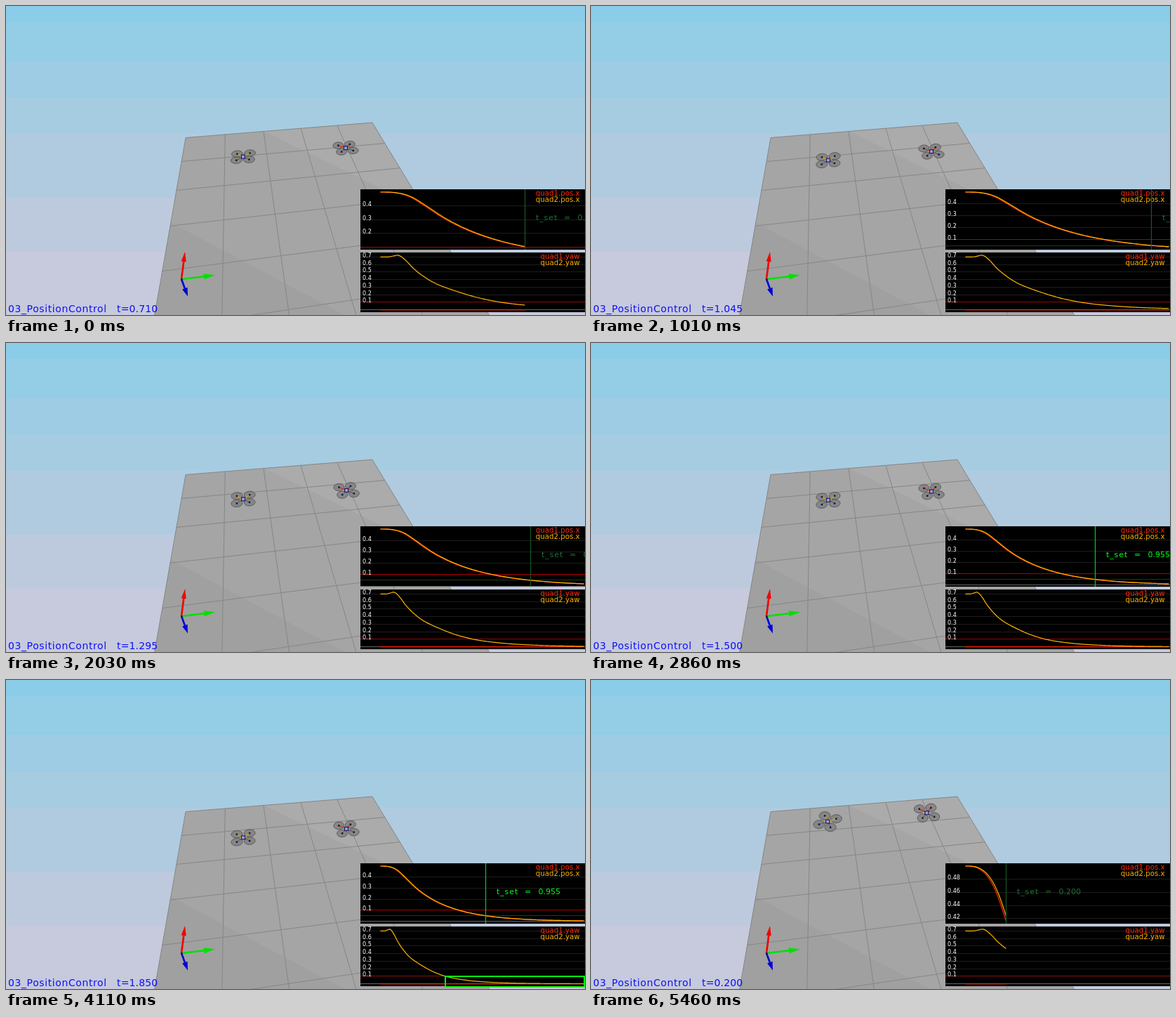
These frames come from a looping animation (825 by 440 pixels, 5.56 s). An HTML page with a canvas:

```html
<!DOCTYPE html>
<html lang="en">
<head>
<meta charset="utf-8">
<title>Position control</title>
<style>
  html, body { margin: 0; width: 100%; height: 100%; overflow: hidden; background: #c6cadc; }
  canvas { display: block; width: 825px; height: 440px; }
</style>
</head>
<body>
<canvas id="stage" width="825" height="440"></canvas>
<script>
const ctx = document.getElementById('stage').getContext('2d');
const LOOP = 5560, STEPS = 93;
const SHORT_STEPS = [15, 45, 56, 71, 76, 83];   // these arrive 10 ms early
const FONT = '"DejaVu Sans", sans-serif';
const RED = '#ff2a0a', AMBER = '#ffb400';

// Smooth curve through [x, y] knots
function curve(knots) {
  const last = knots.length - 1;
  const slope = i => {
    const a = knots[Math.max(0, i - 1)], b = knots[Math.min(last, i + 1)];
    return (b[1] - a[1]) / (b[0] - a[0]);
  };
  return x => {
    if (x <= knots[0][0]) return knots[0][1];
    if (x >= knots[last][0]) return knots[last][1];
    let i = 0;
    while (x > knots[i + 1][0]) i++;
    const [x0, y0] = knots[i], [x1, y1] = knots[i + 1];
    const d = x1 - x0, s = (x - x0) / d, s2 = s * s, s3 = s2 * s;
    return y0 * (2 * s3 - 3 * s2 + 1) + y1 * (3 * s2 - 2 * s3)
      + d * (slope(i) * (s3 - 2 * s2 + s) + slope(i + 1) * (s3 - s2));
  };
}

function linear(knots, x) {
  let i = 0;
  while (i < knots.length - 2 && x > knots[i + 1][0]) i++;
  const [x0, y0] = knots[i], [x1, y1] = knots[i + 1];
  return y0 + (y1 - y0) * (x - x0) / (x1 - x0);
}

// ---- timing ----
const RESTART = 80;
const FIRST_RUN = [[0, .71], [17, 1.045], [34, 1.295], [48, 1.5], [69, 1.85], [79, 2.015]];
const SECOND_RUN = [[80, .005], [84, .07], [92, .2]];

function stepAt(ms) {
  let k = 0;
  const start = n => 60 * n - 10 * SHORT_STEPS.filter(s => s <= n).length;
  while (k < STEPS - 1 && ms >= start(k + 1)) k++;
  return k;
}

function simTime(step) {
  const t = linear(step < RESTART ? FIRST_RUN : SECOND_RUN, step);
  return Math.round(t * 200) / 200;
}

// ---- signals ----
const earlyPos = curve([[0, .5], [.02, .4999], [.045, .4987], [.07, .4953], [.1, .4875],
  [.13, .474], [.16, .4535], [.2, .4165], [.25, .3677], [.3, .319]]);
const pos1 = t => t < .25 ? earlyPos(t) : .746 * Math.exp(-2.83 * t);
const pos2 = t => pos1(Math.max(0, t - .008));
const earlyYaw = curve([[0, .7], [.02, .699], [.043, .701], [.07, .716], [.085, .722],
  [.1, .708], [.126, .65], [.161, .552], [.2, .466], [.25, .378], [.3, .315],
  [.4, .222], [.488, .155], [.59, .1], [.65, .079]]);
const yaw2 = t => t < .59 ? earlyYaw(t) : .1 * Math.exp(-3.9 * (t - .59));
const SETTLE = .955, SETTLED = 1.455, YAW_OK = .59, YAW_PASS = 1.59;

// ---- drawing helpers ----
const crisp = v => Math.floor(v) + .5;

function line(x0, y0, x1, y1, color, width = 1) {
  ctx.strokeStyle = color;
  ctx.lineWidth = width;
  ctx.beginPath();
  ctx.moveTo(x0, y0);
  ctx.lineTo(x1, y1);
  ctx.stroke();
}

function poly(points, fill) {
  ctx.fillStyle = fill;
  ctx.beginPath();
  points.forEach(p => ctx.lineTo(p[0], p[1]));
  ctx.closePath();
  ctx.fill();
}

function text(str, x, y, size, color, align = 'left', spacing = 0) {
  ctx.font = `${size}px ${FONT}`;
  ctx.letterSpacing = spacing + 'px';
  ctx.textAlign = align;
  ctx.fillStyle = color;
  ctx.fillText(str, x, y);
}

// ---- scene ----
// Perspective of the tiled floor: 5 columns wide, running out of view below
const ROWS = 6;
function floor(u, v) {
  const w = 1 + .0148 * u - .087 * v;
  return [(60.9 * u - 27.7 * v + 256) / w, (-1.84 * u + 14.66 * v + 187.5) / w];
}

function drawSky() {
  [[0, '#8bcde8'], [22, '#93cde6'], [78, '#9dcce4'], [130, '#a6cce2'],
   [182, '#b0cbe0'], [273, '#bdcade'], [350, '#c6cadc']].forEach(([y, color]) => {
    ctx.fillStyle = color;
    ctx.fillRect(0, y, 825, 440 - y);
  });
}

function drawFloor() {
  const outline = [floor(0, 0), floor(5, 0), floor(5, ROWS), floor(0, ROWS)];
  ctx.save();
  poly(outline, '#a5a5a5');
  ctx.beginPath();
  outline.forEach(p => ctx.lineTo(...p));
  ctx.closePath();
  ctx.clip();
  poly([[330, 160], [700, 160], [700, 340]], '#ababab');
  poly([[200, 290], [200, 460], [520, 460]], '#a0a0a0');
  ctx.restore();
  for (let u = 0; u <= 5; u++) line(...floor(u, 0), ...floor(u, ROWS), '#868686');
  for (let v = 0; v <= ROWS; v++) line(...floor(0, v), ...floor(5, v), '#868686');
}

function arrow(x, y, tipX, tipY, head, half, color) {
  const len = Math.hypot(tipX - x, tipY - y);
  const dx = (tipX - x) / len, dy = (tipY - y) / len;
  const bx = tipX - dx * head, by = tipY - dy * head;
  line(x, y, bx, by, color, 2.6);
  poly([[tipX, tipY], [bx - dy * half, by + dx * half], [bx + dy * half, by - dx * half]], color);
}

function drawAxes() {
  arrow(250, 389, 255, 350, 14, 3.5, '#f00000');
  arrow(250, 389, 298, 383.3, 16, 4, '#00e000');
  arrow(250, 389, 259, 413.5, 12, 4, '#0000d8');
  ctx.fillStyle = '#222';
  ctx.fillRect(249, 388, 2.5, 2.5);
}

// Screen height of the body's forward axis: grows as the craft pitches
const pitch = curve([[0, 4.8], [.035, 6.7], [.07, 7.7], [.2, 6.4], [.71, 4.5],
  [1.045, 5.1], [1.295, 5.3], [1.5, 5.4], [1.85, 5.5]]);
const sink = curve([[0, 0], [.07, .4], [.2, 2], [.71, 15], [1.045, 20],
  [1.295, 22.7], [1.5, 24.2], [1.85, 24.8]]);
const drift = curve([[0, 0], [.07, .2], [.2, 1.5], [.71, 7], [1.045, 8], [1.85, 8]]);

function drawQuad(x, y, side, lean, height, yaw, rx, color) {
  const ry = 1.6 + .67 * height;
  const rotors = [0, 1, 2, 3].map(k => {
    const a = Math.PI / 4 + k * Math.PI / 2 - yaw;
    const c = Math.SQRT2 * Math.cos(a), s = Math.SQRT2 * Math.sin(a);
    return [x + c * side + s * lean, y - c * .85 - s * height];
  });
  rotors.forEach(([px, py]) => {
    ctx.beginPath();
    ctx.ellipse(px, py, rx, ry, -.06, 0, 7);
    ctx.fillStyle = 'rgba(128,128,128,.85)';
    ctx.fill();
    ctx.strokeStyle = '#5c5c5c';
    ctx.lineWidth = 1;
    ctx.stroke();
  });
  rotors.forEach(([px, py], k) => {
    line(x, y, px, py, k < 2 ? color : '#55556a', k < 2 ? 1.3 : 1);
    ctx.fillStyle = '#15153a';
    ctx.fillRect(px - 1.2, py - 1.2, 2.4, 2.4);
  });
  ctx.fillStyle = '#9ca4c4';
  ctx.fillRect(x - 2.5, y - 2.5, 5, 5);
  ctx.strokeStyle = '#1c1c6c';
  ctx.lineWidth = 1.2;
  ctx.strokeRect(x - 2.5, y - 2.5, 5, 5);
}

// ---- charts ----
const LEFT = 505, RIGHT = 825, X0 = 533.4, SPAN = 290;

function tickStep(range) {
  const base = 10 ** Math.floor(Math.log10(range / 3.8) + 1e-9);
  return base * [5, 2, 1].find(m => range / (base * m) >= 3.8 || m === 1);
}

function drawChart(c, t) {
  const px = s => X0 + SPAN * s / Math.max(1, t);
  const range = c.max - c.min;
  const py = v => c.top + (c.max - v) * (c.bottom - c.top) / range;
  const level = (v, color) => line(LEFT, crisp(py(v)), RIGHT, crisp(py(v)), color);

  ctx.save();
  ctx.beginPath();
  ctx.rect(LEFT, c.y, RIGHT - LEFT, c.h);
  ctx.clip();
  ctx.fillStyle = '#000';
  ctx.fillRect(LEFT, c.y, RIGHT - LEFT, c.h);

  const step = tickStep(range);
  const digits = Math.max(1, -Math.floor(Math.log10(step) + 1e-6));
  const eps = step * 1e-3;
  const ticks = [];
  for (let n = Math.floor(c.min / step) + 1; n * step < c.max - eps; n++) {
    if (n * step > c.min + eps) ticks.push(n * step);
  }
  ticks.forEach(v => level(v, '#1d1d1d'));
  level(0, '#666');
  level(.1, c.limit);
  if (c.band) level(c.band, '#1b3a20');

  c.series.forEach(([name, fn, color], i) => {
    ctx.strokeStyle = color;
    ctx.lineWidth = 1.2;
    ctx.beginPath();
    const count = Math.max(2, Math.ceil(px(t) - X0));
    for (let n = 0; n <= count; n++) {
      const s = t * n / count;
      ctx.lineTo(px(s), py(fn(s)));
    }
    ctx.stroke();
    text(name, 817.5, c.y + 9 + 9 * i, 10.2, color, 'right');
  });
  ticks.forEach(v => text(v.toFixed(digits), 508, py(v) + .5, 8, '#fff'));
  if (c.extra) c.extra(px);
  ctx.restore();
}

function drawSettling(t, px) {
  const set = Math.min(t, SETTLE), done = t >= SETTLED;
  const color = done ? '#00ff14' : '#1d7230';
  const x = Math.round(px(set)) + .5;
  line(x, 261, x, 347, done ? '#00d010' : '#165a24', 1.2);
  text('t_set', x + 15.5, 304.5, 11, color, 'left', .9);
  text('=', x + 55.5, 304.5, 11, color);
  text(set.toFixed(3), x + 75, 304.5, 11, color);
}

function draw(t) {
  drawSky();
  drawFloor();
  drawAxes();
  const h = pitch(t), dy = sink(t), dx = drift(t);
  drawQuad(337 + dx / 8, 199.6 + dy, 9.1, 0, h, yaw2(t), 8, '#e0a000');
  drawQuad(477 + dx, 187.2 + dy, 8.3, -2.4, h, 0, 7.5, '#e02808');

  drawChart({
    y: 261, h: 86, top: 265, bottom: 343, max: .5, min: Math.min(pos1(t), .49999),
    limit: '#b00000', band: .05,
    series: [['quad1.pos.x', pos1, RED], ['quad2.pos.x', pos2, AMBER]],
    extra: px => drawSettling(t, px)
  }, t);
  drawChart({
    y: 351, h: 85, top: 354.9, bottom: 432.6, max: .722, min: 0, limit: '#8c0c0c',
    series: [['quad1.yaw', () => 0, RED], ['quad2.yaw', yaw2, AMBER]]
  }, t);
  if (t >= YAW_PASS) {
    const x = Math.round(X0 + SPAN * YAW_OK / t);
    ctx.strokeStyle = '#00f810';
    ctx.lineWidth = 2;
    ctx.strokeRect(x, 422, 824 - x, 15);
  }

  text('03_PositionControl', 3, 435.5, 14, '#1010f8', 'left', .6);
  text('t=' + t.toFixed(3), 158, 435.5, 14, '#1010f8', 'left', .15);
}

const began = performance.now();
let shown = -1;
function tick() {
  const step = stepAt((performance.now() - began) % LOOP);
  if (step !== shown) {
    shown = step;
    draw(simTime(step));
  }
  requestAnimationFrame(tick);
}
tick();
</script>
</body>
</html>
```
